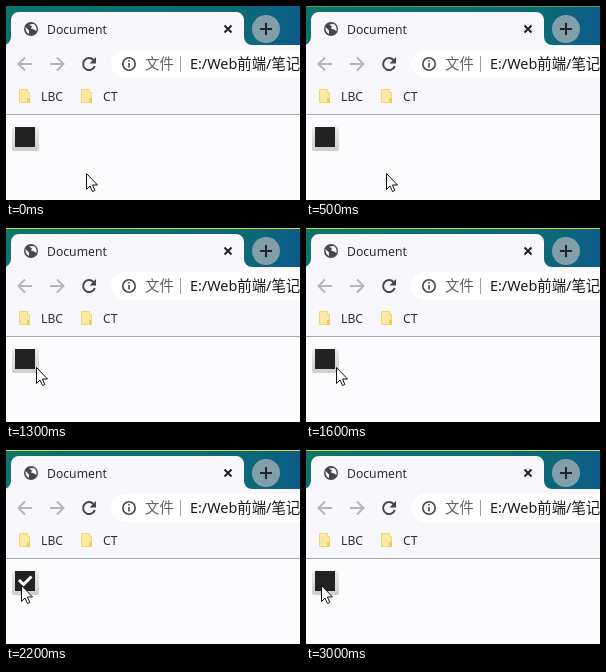
Animation of 294x194 px, one loop 3.1 s. Source, as an HTML page:

```html
<!DOCTYPE html>
<html lang="zh">
<head>
<meta charset="utf-8">
<title>Document</title>
<style>
html, body { margin: 0; width: 100%; height: 100%; overflow: hidden; background: #fcfcff; }
svg { display: block; width: 294px; height: 194px; }
text { font: 12.2px "Noto Sans", "Noto Sans CJK SC", "Noto Sans CJK", sans-serif; fill: #2b2e32; }
.url { font-size: 14.4px; fill: #17181b; }
.line { fill: none; stroke: #44484d; stroke-width: 2; }
.pale { stroke: #b4b6bb; }
.dark { stroke: #202427; }
#edge { animation: edge 3.1s infinite; }
#tick { animation: tick 3.1s step-end infinite; }
#cursor { animation: move 3.1s infinite; }
@keyframes edge {
  0% { opacity: 0; animation-timing-function: steps(12); }
  38.71%, 100% { opacity: 1; }
}
@keyframes tick {
  0% { opacity: 0; }
  67.742% { opacity: 1; }
  80.645%, 100% { opacity: 0; }
}
@keyframes move {
  0% { transform: translate(80px, 167px); animation-timing-function: step-end; }
  19.355% { transform: translate(80px, 167px); animation-timing-function: steps(6); }
  38.71% { transform: translate(31px, 142px); animation-timing-function: step-end; }
  41.935% { transform: translate(30px, 139px); animation-timing-function: step-end; }
  58.065% { transform: translate(28px, 138px); animation-timing-function: steps(3); }
  67.742%, 100% { transform: translate(15px, 135px); animation-timing-function: step-end; }
}
</style>
</head>
<body>
<svg viewBox="0 0 294 194">
  <defs>
    <linearGradient id="frame">
      <stop offset="0" stop-color="#0d746c"/>
      <stop offset=".8" stop-color="#0c6a77"/>
      <stop offset="1" stop-color="#0c5c8a"/>
    </linearGradient>
    <linearGradient id="bevel" x2="0" y2="1">
      <stop offset="0" stop-color="#ecebea"/>
      <stop offset="1" stop-color="#cfcecd"/>
    </linearGradient>
    <g id="folder">
      <path d="M.5 .5H8.5V3.5H10.5V13.5H.5Z" fill="#fdeaa2" stroke="#f5d675"/>
      <path d="M8 9H11V14H8Z" fill="#f3cd58"/>
    </g>
  </defs>

  <rect width="294" height="39" fill="url(#frame)"/>
  <path id="edge" d="M0 .5H294" stroke="#c9dc3c"/>
  <rect y="39" width="294" height="69" fill="#f8f8fc"/>
  <path d="M-3 39A8 8 0 0 0 5 31V14A8 8 0 0 1 13 6H230A8 8 0 0 1 238 14V31A8 8 0 0 0 246 39Z" fill="#f8f8fc"/>

  <circle cx="25" cy="23" r="7" fill="#44484d"/>
  <path d="M19.5 21L23 24.5V28Q19 26 19.5 21ZM23 18.5L28 18Q31 20 30.5 25L28 23.5L25 22.5L26 20.5Z" fill="#f8f8fc"/>
  <text x="41" y="27.5">Document</text>
  <path class="line dark" d="M218.5 19.5L225.5 26.5M225.5 19.5L218.5 26.5"/>

  <circle cx="260" cy="23" r="14" fill="#829fa9"/>
  <path class="line dark" d="M254 23H266M260 17V29"/>

  <path class="line pale" d="M26 58H13M19 51.5L12.5 58L19 64.5"/>
  <path class="line pale" d="M44 58H57M51 51.5L57.5 58L51 64.5"/>
  <path class="line" d="M87.5 54A6 6 0 1 0 88.8 60"/>
  <path d="M90 51V57.5H83.5Z" fill="#44484d"/>

  <path d="M294 44H119A14 14 0 0 0 119 72H294Z" fill="#fff"/>
  <circle class="line" cx="123" cy="58" r="6.2" style="stroke-width:1.6"/>
  <path d="M122.2 57H123.8V61.5H122.2ZM122.2 54H123.8V55.6H122.2Z" fill="#44484d"/>
  <text class="url" x="139" y="63" style="fill:#5f6368">文件</text>
  <path d="M174.5 50V66" stroke="#a0a2a6"/>
  <text class="url" x="184" y="63">E:/Web前端/笔记</text>

  <use href="#folder" x="13" y="83"/>
  <text x="35" y="95">LBC</text>
  <use href="#folder" x="75" y="83"/>
  <text x="97" y="95">CT</text>

  <path d="M0 108.5H294" stroke="#a9a9ae"/>

  <rect x="6" y="121" width="27" height="24" rx="2" fill="url(#bevel)"/>
  <rect x="9" y="121" width="20" height="20" fill="#222223"/>
  <path id="tick" d="M13 130L17.5 134.5L25.5 126.5" fill="none" stroke="#fff" stroke-width="3"/>

  <path id="cursor" d="M.5 .5V16.5L4 13L6.5 18.5L8.8 17.5L6.5 12H11.5Z" fill="#fff" stroke="#111"/>
</svg>
</body>
</html>
```
